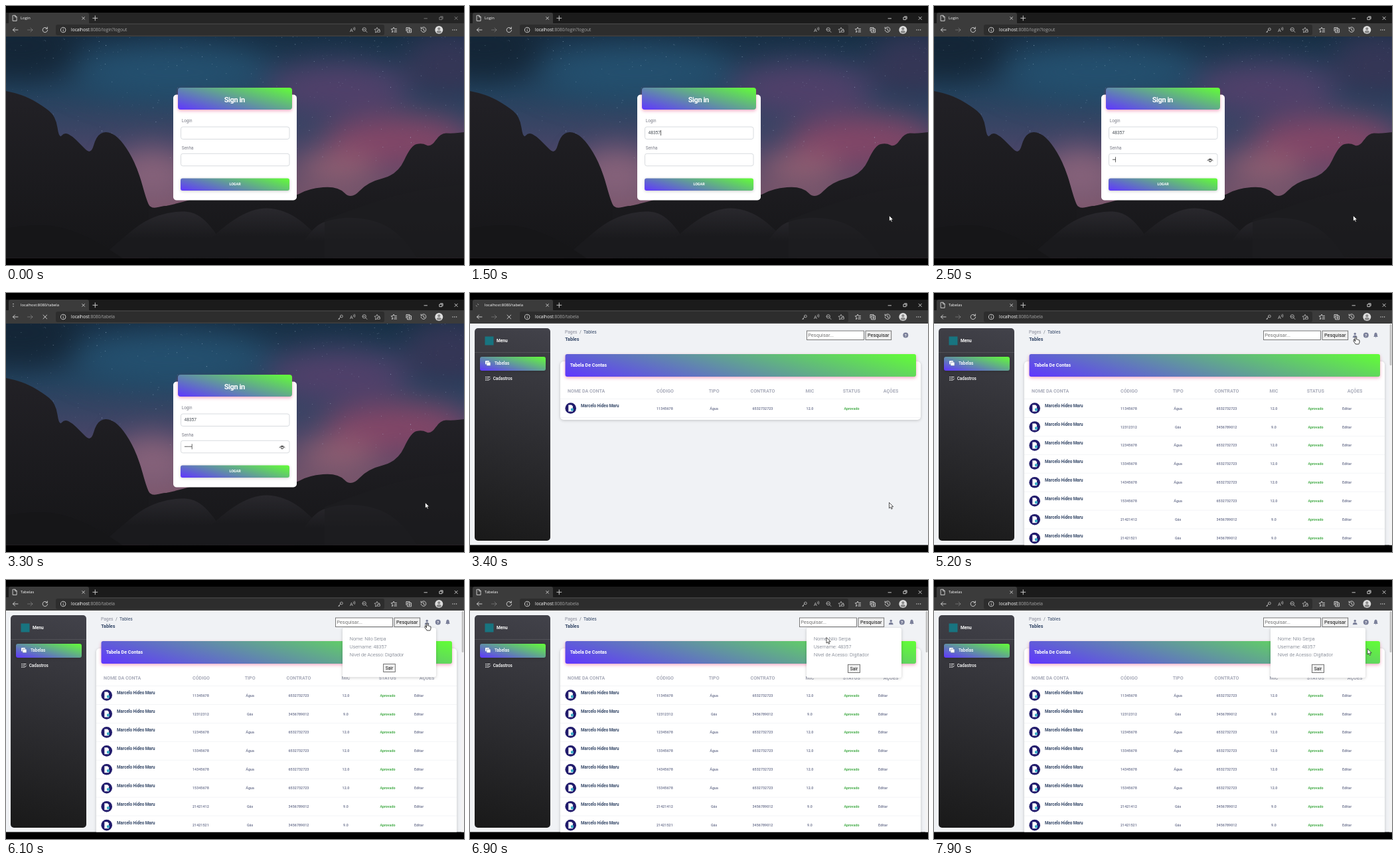
An HTML page that plays this animation: 690 by 390 pixels, repeating every 8 s.

```html
<!DOCTYPE html>
<html lang="pt">
<head>
<meta charset="utf-8">
<title>Tabela</title>
<style>
html, body { margin: 0; width: 100%; height: 100%; overflow: hidden; background: #000; }
svg { display: block; width: 100%; height: 100%; font-family: Roboto, sans-serif; }
.ui { font-family: "Open Sans", "Noto Sans", sans-serif; }
.icon { fill: none; stroke: #d8d8d8; stroke-width: .9; stroke-linecap: round; stroke-linejoin: round; }
.shadow { filter: drop-shadow(0 1.5px 2px #0003); }
.glow { filter: drop-shadow(0 2px 2.5px #e91e6360); }
.blur { filter: blur(22px); }
</style>
</head>
<body>
<svg id="stage" viewBox="0 0 690 390"></svg>
<script>
const stage = document.getElementById('stage');
const USER = '48357', PERSON = 'Nilo Serpa', HOLDER = 'Marcelo Hideo Maru';

// Drawing helpers
let defs = '', count = 0;
const text = (x, y, size, fill, str, weight = 400, anchor = 'start', more = '') =>
  `<text x="${x}" y="${y}" font-size="${size}" fill="${fill}" font-weight="${weight}" text-anchor="${anchor}" ${more}>${str}</text>`;
const rect = (x, y, w, h, fill, r = 0, more = '') =>
  `<rect x="${x}" y="${y}" width="${w}" height="${h}" rx="${r}" fill="${fill}" ${more}/>`;
const dot = (x, y, r, fill, more = '') => `<circle cx="${x}" cy="${y}" r="${r}" fill="${fill}" ${more}/>`;
const line = (d, more = '') => `<path class="icon" d="${d}" ${more}/>`;
const group = (id, body, more = '') => `<g id="${id}" ${more}>${body}</g>`;

// Box filled along a 195 degree axis
function slope(x, y, w, h, from, to, r, more = '') {
  const a = Math.PI / 12, id = 'g' + count++;
  const len = (w * Math.sin(a) + h * Math.cos(a)) / 2;
  const dx = -Math.sin(a) * len, dy = Math.cos(a) * len, cx = x + w / 2, cy = y + h / 2;
  defs += `<linearGradient id="${id}" gradientUnits="userSpaceOnUse" x1="${cx - dx}" y1="${cy - dy}" x2="${cx + dx}" y2="${cy + dy}">
    <stop stop-color="${from}"/><stop offset="1" stop-color="${to}"/></linearGradient>`;
  return rect(x, y, w, h, `url(#${id})`, r, more);
}
const vivid = (x, y, w, h, r, more) => slope(x, y, w, h, '#62ff35', '#6036ff', r, more);

// Rounded outline through a few points, closed along the bottom
function ridge(points, fill) {
  const p = points.split(' ').map(s => s.split(',').map(Number));
  let d = `M${p[0]}`;
  for (let i = 1; i < p.length - 1; i++)
    d += `Q${p[i]} ${(p[i][0] + p[i + 1][0]) / 2},${(p[i][1] + p[i + 1][1]) / 2}`;
  const end = p[p.length - 1];
  return `<path d="${d}L${end}V390H${p[0][0]}Z" fill="${fill}"/>`;
}

function landscape() {
  let seed = 7, stars = '';
  const rnd = () => (seed = seed * 16807 % 2147483647) / 2147483647;
  for (let i = 0; i < 420; i++) {
    const x = rnd() * 690, y = 46 + rnd() ** 1.5 * 190;
    stars += dot(x.toFixed(1), y.toFixed(1), (.25 + rnd() * .3).toFixed(2), '#bcd4e8', `opacity="${(.15 + rnd() * .5).toFixed(2)}"`);
  }
  defs += `<linearGradient id="sky" x2="0" y2="1"><stop stop-color="#172f45"/><stop offset=".25" stop-color="#24435f"/>
    <stop offset=".5" stop-color="#464567"/><stop offset=".75" stop-color="#785469"/></linearGradient>
    <linearGradient id="rock" x2="0" y2="1"><stop stop-color="#222126"/><stop offset="1" stop-color="#151517"/></linearGradient>
    <linearGradient id="stone" x2="0" y2="1"><stop stop-color="#29282d"/><stop offset=".5" stop-color="#1a1a1d"/></linearGradient>`;
  const blob = (x, y, rx, ry, fill) => `<ellipse cx="${x}" cy="${y}" rx="${rx}" ry="${ry}" fill="${fill}"/>`;
  return rect(0, 46, 690, 334, 'url(#sky)')
    + `<g class="blur">${blob(250, 100, 150, 40, '#24506f')}${blob(20, 60, 90, 50, '#142637')}${blob(500, 125, 110, 40, '#51406a')}
      ${blob(590, 205, 110, 40, '#824667')}${blob(670, 90, 70, 50, '#353656')}${blob(220, 255, 60, 40, '#86627a')}${blob(500, 245, 60, 24, '#916072')}</g>`
    + stars
    + ridge('0,128 25,133 55,150 75,166 80,200 88,190 100,196 112,208 128,224 136,196 150,188 168,196 186,220 200,250 211,290 218,306 240,300 262,302 300,290', 'url(#rock)')
    + ridge('215,306 250,300 300,285 430,290 455,275 500,271 520,292 545,265 590,254 610,210 627,206 640,213 655,191 672,192 690,190', 'url(#rock)')
    + ridge('130,390 175,350 210,322 250,309 288,310 320,345 340,390', 'url(#stone)')
    + ridge('270,390 315,340 375,302 425,308 470,345 500,390', 'url(#stone)')
    + ridge('430,390 455,335 500,317 560,322 600,350 625,390', 'url(#stone)')
    + ridge('480,322 560,292 625,276 690,268', '#1d1d21b0')
    + ridge('0,335 50,326 110,340 165,372 190,390', '#161618');
}

function login() {
  const field = y => rect(263.5, y, 163.5, 18.5, '#fff', 3, 'stroke="#d4d7dc" stroke-width=".9"');
  return landscape()
    + rect(252, 133.5, 186, 159, '#fff', 5)
    + vivid(259, 123, 172, 33, 4, 'class="glow"')
    + text(344.3, 144.8, 11, '#fff', 'Sign in', 700, 'middle', 'letter-spacing="-.4"')
    + text(264.7, 175.2, 6.4, '#7b7d88', 'Login') + field(182)
    + text(264.7, 215.8, 6.4, '#7b7d88', 'Senha') + field(222.3)
    + vivid(263, 259.5, 164, 18.5, 3, 'class="shadow"')
    + text(345, 270.3, 5.4, '#fff', 'LOGAR', 700, 'middle')
    + text(268.5, 193.4, 6.6, '#495057', '', 400, 'start', 'id="user"')
    + group('bullets', '')
    + rect(0, 0, .7, 8, '#222', 0, 'id="caret"')
    + group('eye', line('M412 232.8Q416 227 420 232.8', 'style="stroke:#222"') + dot(416, 233, 1.7, 'none', 'stroke="#222" stroke-width=".9"'));
}

function row(i) {
  const code = ['11345678', '12312312', '12345678', '13345678', '14345678', '15345678', '21421412', '21421521'][i];
  const gas = [1, 6, 7].includes(i), grey = '#7b809a';
  const cell = (x, str, fill = grey, anchor = 'middle') => text(x, 175.6, 5.4, fill, str, 700, anchor);
  return `<g transform="translate(0 ${i * 27.95})">`
    + dot(151.7, 173.5, 8.3, '#211b6c')
    + `<path d="M148.3 168.5h4.6l2 2v8h-6.6z" fill="#fff"/>` + rect(152, 173.5, 4, 4, '#38a8c4', 1)
    + text(167, 172.3, 6.3, '#344767', HOLDER, 600)
    + cell(281, code, grey, 'start') + cell(367.6, gas ? 'Gás' : 'Água')
    + cell(441, gas ? '3456789012' : '6532732723') + cell(512, gas ? '9.0' : '12.0')
    + cell(575, 'Aprovado', '#4caf50')
    + `<g class="edit">${cell(615, 'Editar', grey, 'start')}</g>`
    + rect(136, 187, 543, .7, '#eef0f3') + '</g>';
}

const search = x => rect(x + .5, 57, 86, 13.5, '#fff', 0, 'stroke="#6c6c6c" stroke-width=".9"')
  + text(x + 2.2, 66.2, 7.5, '#757575', 'Pesquisar...')
  + rect(x + 89, 57, 38.7, 13.5, '#efefef', 0, 'stroke="#666" stroke-width=".9"')
  + text(x + 108.2, 66.2, 7.3, '#111', 'Pesquisar', 400, 'middle');
const help = x => dot(x, 63.4, 4, '#7b809a') + text(x, 65.7, 6, '#fff', '?', 700, 'middle');

function table() {
  const head = (x, str, anchor = 'middle') => text(x, 150.4, 7.1, '#a9acba', str, 700, anchor);
  let rest = '';
  for (let i = 1; i < 8; i++) rest += row(i);
  return rect(0, 46, 690, 334, '#f0f2f5')
    + slope(7, 53, 114, 320, '#42424a', '#191919', 5)
    + rect(22.5, 65.5, 13, 13, '#187480')
    + text(40, 74, 6.6, '#fff', 'Menu', 700) + rect(7, 89.3, 114, .7, '#ffffff28')
    + vivid(15, 96, 99, 21, 3, 'class="shadow"')
    + rect(23, 102, 6, 5.5, '#fff', 1) + rect(25, 104, 6, 5.5, '#fff', 1, 'stroke="#6a7ea8" stroke-width=".7"')
    + text(37, 108.4, 6.4, '#fff', 'Tabelas', 500)
    + line('M23.5 126.5h1M23.5 129h1M23.5 131.3h1M26 126.5h4M26 129h2M26 131.3h1M28 131.5l2.5-2.5', 'style="stroke:#fff"')
    + text(34.7, 131, 6.4, '#fff', 'Cadastros', 500)
    + text(143, 60.6, 6.7, '#8a8d9c', 'Pages') + text(165, 60.6, 6.7, '#6c757d', '/') + text(171, 60.6, 6.7, '#344767', 'Tables')
    + text(143.2, 71.6, 7.2, '#344767', 'Tables', 700)
    + group('early', search(507) + help(656.3))
    + group('late', search(496) + help(650.8)
      + dot(634.2, 61.5, 1.7, '#7b809a') + '<path d="M630.8 67.2q0-3.5 3.4-3.5t3.4 3.5z" fill="#7b809a"/>'
      + '<path d="M662.2 66q1-1 1-3.2 0-2.6 2.3-3.2 2.3.6 2.3 3.2 0 2.2 1 3.2zM664.5 66.6h2l-1 1z" fill="#7b809a"/>')
    + rect(136, 103, 543, 88, '#fff', 5, 'id="card" class="shadow"')
    + vivid(143.5, 92, 528.5, 34, 3, 'class="glow"')
    + text(150.7, 111.2, 7.1, '#fff', 'Tabela De Contas', 700)
    + head(147, 'NOME DA CONTA', 'start') + head(281, 'CÓDIGO', 'start') + head(367.6, 'TIPO')
    + head(441, 'CONTRATO') + head(512, 'MIC') + head(574.7, 'STATUS') + head(634, 'AÇÕES')
    + rect(136, 159.3, 543, .7, '#eef0f3') + row(0) + group('rest', rest)
    + group('scroll', rect(686, 46, 4, 334, '#f4f4f4') + rect(686.6, 47, 2.8, 62, '#c1c1c1', 1))
    + group('popup', rect(507, 72, 143, 75.3, '#fff', 3, 'class="shadow"')
      + [`Nome: ${PERSON}`, `Username: ${USER}`, 'Nível de Acesso: Digitador']
        .map((s, i) => text(518, 91.4 + i * 12, 7.3, '#5f6675', s, 300)).join('')
      + rect(569.5, 127.3, 18, 12.2, '#efefef', 0, 'stroke="#666" stroke-width=".9"')
      + text(578.5, 135.5, 6.7, '#111', 'Sair', 400, 'middle'));
}

function chrome() {
  return rect(0, 10, 690, 17, '#1b1b1b', 0, 'id="strip"')
    + `<path d="M2 27q2 0 2-2V13q0-3 3-3H122q3 0 3 3V25q0 2 2 2z" fill="#3b3b3b"/>` + rect(0, 26, 690, 20, '#3b3b3b')
    + rect(75, 28, 495, 16, '#2d2d2d', 3)
    + group('page', line('M10.5 14.2h3.4l2.2 2.2v6h-5.6zM13.7 14.2v2.4h2.4'))
    + line('M10.5 16.5a2 2 0 0 1 1 0M10.5 20a2 2 0 0 0 1 0', 'id="spin"')
    + text(22, 20.4, 5.8, '#fff', '', 400, 'start', 'id="title" class="ui"')
    + line('M114.8 16.6l3.6 3.6m0-3.6l-3.6 3.6M134.3 14.8v7M130.8 18.3h7')
    + group('controls', line('M630 18.8h4.5M653.3 17h3.6v3.6h-3.6zM654.6 15.8h3.5v3.5M676 16.2l4.3 4.3m0-4.3l-4.3 4.3'))
    + line('M18 36H10.5M13.5 33l-3 3 3 3') + line('M32.5 36H40M37 33l3 3-3 3', 'opacity=".35"')
    + group('reload', line('M62 34a3.7 3.7 0 1 0 .6 2.3M62.3 31.8v2.4h-2.4'))
    + group('stop', line('M56 33.2l5.6 5.6m0-5.6l-5.6 5.6'))
    + line('M82.4 36a3.8 3.8 0 1 0 7.6 0a3.8 3.8 0 1 0-7.6 0M86.2 35.8v2M86.2 34v.1')
    + '<text class="ui" x="98" y="38.4" font-size="6.6" fill="#fff">localhost<tspan fill="#a5a5a5" id="path"></tspan></text>'
    + group('key', line('M503.5 35a1.9 1.9 0 1 0 3.8 0a1.9 1.9 0 1 0-3.8 0M503.9 36.2l-3.2 3.2h1.6v-1.4', 'opacity=".75"'))
    + text(518, 39, 7.5, '#bbb', 'A', 400, 'start', 'class="ui"')
    + line('M523.5 33q1 1.3 0 2.6M525.2 32q1.5 2.3 0 4.6', 'opacity=".75"')
    + line('M537 35.3a2.7 2.7 0 1 0 5.4 0a2.7 2.7 0 1 0-5.4 0M541.8 37.3l2.2 2.3M538.5 35.3h2.4', 'opacity=".75"')
    + line('M559 39l-2.5 1 .5-2.8-2-2 2.8-.4 1.2-2.5 1.2 2.5 2.8.4-1 1M559.8 39.2h3.6v-2.6h-3.6z', 'opacity=".75"')
    + line('M583 38l-1.3 1.8.5-3-1.9-2 2.6-.4 1.2-2.3 1.1 2.3h3.3M585.5 36.8h3M584.8 39h3.7')
    + line('M603 37.5v-5h5.2v1.2M605 34.5h5.6v5.4H605zM607.8 35.8v2.8M606.4 37.2h2.8')
    + line('M625.8 33.5a3.8 3.8 0 1 1-.6 2.5M625.2 32v2h2M629 34v2.2l1.6.8')
    + dot(652.3, 36, 6, '#dedede') + dot(652.3, 34.3, 2, '#8b8b8b') + '<path d="M648.6 39.8q0-3 3.7-3t3.7 3q-3.7 2.5-7.4 0z" fill="#8b8b8b"/>'
    + [673, 675.8, 678.6].map(x => dot(x, 36, .7, '#ddd')).join('');
}

const pointer = group('arrow', '<path d="M0 0V8.6L2 6.8 3.4 9.8 4.8 9.2 3.5 6.3H6.2Z" fill="#fff" stroke="#111" stroke-width=".7"/>')
  + group('hand', '<path d="M-1 .8Q0-.8 1 .8V4Q2 3.4 2.7 4.3 3.6 3.8 4.2 4.8 5.5 4.5 5.5 6V8Q5.3 9.5 4.4 11H-.3Q-1.5 9-3.4 6.8-3-.0 -1 7Z" fill="#fff" stroke="#111" stroke-width=".8"/>');

const body = group('login', login()) + group('table', table());
const frame = chrome();
stage.innerHTML = `<defs>${defs}<clipPath id="view"><rect y="46" width="690" height="333.5"/></clipPath></defs>
  <rect width="690" height="390"/><g clip-path="url(#view)">${body}</g>${frame}${group('cursor', pointer)}`;

const el = Object.fromEntries([...stage.querySelectorAll('[id]')].map(e => [e.id, e]));
const show = (id, on) => el[id].style.display = on ? '' : 'none';
const passed = (t, times) => times.filter(s => t >= s).length;

const track = [[3600, 631.5, 315.5], [4000, 642, 262], [4500, 655, 109], [4700, 650, 92], [5000, 635.5, 66],
  [5200, 635.5, 66], [5700, 634.5, 65], [6200, 634.5, 65], [6800, 560, 86], [7000, 514, 87], [7200, 585, 92],
  [7400, 516, 104], [7700, 560, 110], [7800, 664, 108], [7900, 653, 103.5]];
function place(t) {
  if (t <= track[0][0]) return track[0].slice(1);
  const i = track.findIndex(k => k[0] >= t), [a, x, y] = track[i - 1], [b, u, v] = track[i];
  const k = (t - a) / (b - a);
  return [x + (u - x) * k, y + (v - y) * k];
}

function draw(t) {
  const loading = t >= 2800 && t < 3600, done = t >= 3600, inside = t >= 3400;
  show('login', !inside); show('table', inside);

  // Typing
  const typed = passed(t, [700, 800, 900, 1100, 1500]);
  const hidden = passed(t, [2300, 2500, 2600, 2800, 2800]);
  el.user.textContent = USER.slice(0, typed);
  el.bullets.innerHTML = [...Array(hidden).keys()].map(i => dot(270 + i * 2.2, 231.3, .8, '#333')).join('');
  show('caret', t >= 300 && t !== 2000);
  el.caret.setAttribute('x', t < 2000 ? 268.6 + typed * 3.7 : 268.8 + hidden * 2.2);
  el.caret.setAttribute('y', t < 2000 ? 187 : 227.3);
  show('eye', t >= 2300); show('key', t >= 2300);

  // Browser frame
  el.strip.setAttribute('fill', t < 100 ? '#252525' : '#1b1b1b');
  el.controls.style.opacity = t < 100 ? .5 : 1;
  el.title.textContent = done ? 'Tabelas' : loading ? 'localhost:8080/tabela' : 'Login';
  el.path.textContent = t < 2800 ? ':8080/login?logout' : ':8080/tabela';
  show('page', !loading); show('spin', loading); show('reload', !loading); show('stop', loading);
  el.spin.setAttribute('transform', `rotate(${(t - 3300) * .45} 11 18.2)`);

  // Table
  show('early', !done); show('late', done); show('scroll', done); show('rest', t >= 3500);
  el.card.setAttribute('height', t >= 3500 ? 300 : 88);
  stage.querySelectorAll('.edit').forEach(e => e.style.display = t >= 3500 ? '' : 'none');
  show('popup', t >= 6000);
  const grow = 1 - .028 * Math.max(0, 1 - (t - 6000) / 200);
  el.popup.setAttribute('transform', `translate(507 72) scale(${grow}) translate(-507 -72)`);
  el.popup.style.opacity = t < 6100 ? .6 : 1;

  const hand = t >= 4900 && t <= 6200;
  show('cursor', t >= 100); show('hand', hand); show('arrow', !hand);
  el.cursor.setAttribute('transform', `translate(${place(t)})`);
}

let last = -1;
const start = performance.now();
function tick() {
  const t = Math.floor((performance.now() - start) % 8000 / 100) * 100;
  if (t !== last) draw(last = t);
  requestAnimationFrame(tick);
}
tick();
</script>
</body>
</html>
```
